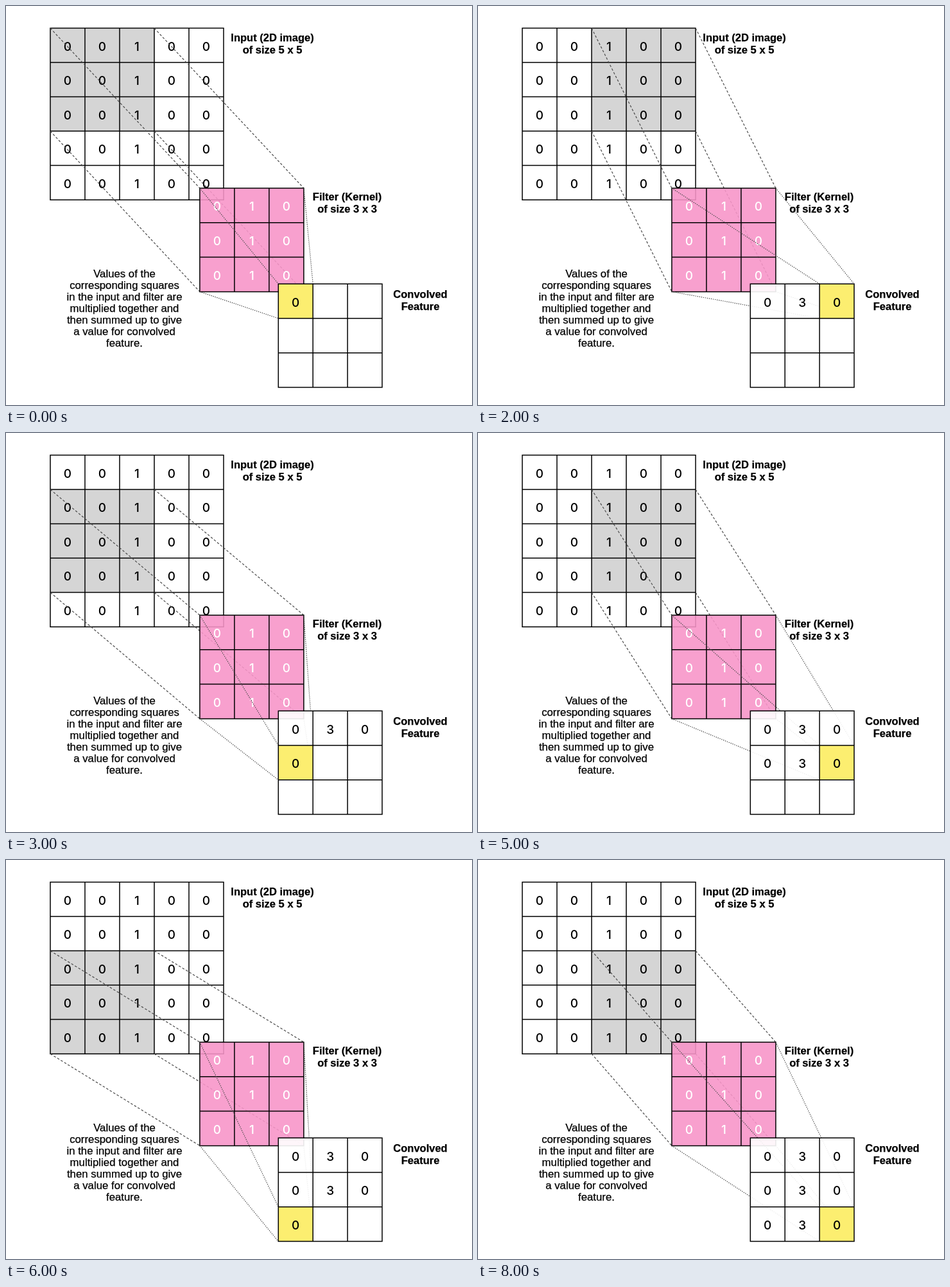
Recreate the animation shown at these times as an HTML page with a canvas. Size 726 px wide and 622 px high, loop 9000 ms.

```html
<!DOCTYPE html>
<html lang="en">
<head>
<meta charset="utf-8">
<title>Convolution</title>
<style>
  html, body { margin: 0; width: 100%; height: 100%; overflow: hidden; background: #fff; }
  canvas { display: block; }
</style>
</head>
<body>
<canvas id="stage" width="726" height="622"></canvas>
<script>
const ctx = document.getElementById('stage').getContext('2d');
const STEP = 1000;
const PATTERN = [0, 0, 1, 0, 0];
const input = { x: 69, y: 34.5, n: 5, w: 54, h: 53.53 };
const kernel = { x: 301.9, y: 284, n: 3, w: 54, h: 53.8 };
const output = { x: 424.3, y: 433.2, n: 3, w: 53.9, h: 53.8 };

// Outline of a block of size x size cells
const block = (g, col, row, size) => ({
  x: g.x + col * g.w, y: g.y + row * g.h, w: size * g.w, h: size * g.h
});

const corners = b => [
  [b.x, b.y], [b.x + b.w, b.y], [b.x, b.y + b.h], [b.x + b.w, b.y + b.h]
];

function fill(b, color) {
  ctx.fillStyle = color;
  ctx.fillRect(b.x, b.y, b.w, b.h);
}

function gridLines(g) {
  ctx.strokeStyle = '#000';
  ctx.lineWidth = 1.5;
  ctx.lineCap = 'square';
  ctx.setLineDash([]);
  ctx.beginPath();
  for (let i = 0; i <= g.n; i++) {
    const x = g.x + i * g.w, y = g.y + i * g.h;
    ctx.moveTo(x, g.y);
    ctx.lineTo(x, g.y + g.n * g.h);
    ctx.moveTo(g.x, y);
    ctx.lineTo(g.x + g.n * g.w, y);
  }
  ctx.stroke();
}

function digits(g, color, valueAt) {
  ctx.fillStyle = color;
  ctx.font = '500 19px Inter, sans-serif';
  for (let row = 0; row < g.n; row++) {
    for (let col = 0; col < g.n; col++) {
      ctx.fillText(valueAt(col, row), g.x + (col + 0.5) * g.w, g.y + row * g.h + 35.3);
    }
  }
}

function connect(from, to, dash) {
  const ends = corners(to);
  ctx.strokeStyle = '#4a4a4a';
  ctx.lineWidth = 1.2;
  ctx.lineCap = 'butt';
  ctx.setLineDash(dash);
  ctx.beginPath();
  corners(from).forEach((p, i) => {
    ctx.moveTo(...p);
    ctx.lineTo(...ends[i]);
  });
  ctx.stroke();
}

function label(lines, x, y, leading, font) {
  ctx.fillStyle = ctx.strokeStyle = '#000';
  ctx.lineWidth = 0.25;
  ctx.setLineDash([]);
  ctx.font = font + ' "Liberation Sans", Arial, sans-serif';
  lines.forEach((line, i) => {
    ctx.fillText(line, x, y + i * leading);
    ctx.strokeText(line, x, y + i * leading);
  });
}

function labels() {
  const bold = 'bold 16.5px';
  label(['Input (2D image)', 'of size 5 x 5'], 415, 55.4, 19, bold);
  label(['Filter (Kernel)', 'of size 3 x 3'], 531.5, 303, 19, bold);
  label(['Convolved', 'Feature'], 645.5, 454.5, 19, bold);
  label([
    'Values of the', 'corresponding squares', 'in the input and filter are',
    'multiplied together and', 'then summed up to give',
    'a value for convolved', 'feature.'
  ], 184.5, 422.7, 18, '16.8px');
}

function draw(step) {
  const col = step % 3, row = Math.floor(step / 3);
  const area = block(input, col, row, 3);
  const lens = block(kernel, 0, 0, 3);
  const cell = block(output, col, row, 1);

  ctx.fillStyle = '#fff';
  ctx.fillRect(0, 0, 726, 622);
  ctx.textAlign = 'center';

  fill(area, '#d5d5d5');
  gridLines(input);
  digits(input, '#000', c => PATTERN[c]);
  labels();
  connect(area, lens, [3.6, 2.8]);

  fill(lens, 'rgba(248, 149, 200, 0.89)');
  gridLines(kernel);
  digits(kernel, '#fff', c => PATTERN[c + 1]);
  connect(lens, cell, [1.4, 1.7]);

  fill(block(output, 0, 0, 3), 'rgba(255, 255, 255, 0.9)');
  fill(cell, '#fcee70');
  gridLines(output);
  digits(output, '#000', (c, r) => r * 3 + c <= step ? 3 * PATTERN[c + 1] : '');
}

function frame() {
  draw(Math.floor(performance.now() / STEP) % 9);
  requestAnimationFrame(frame);
}
frame();
</script>
</body>
</html>
```
